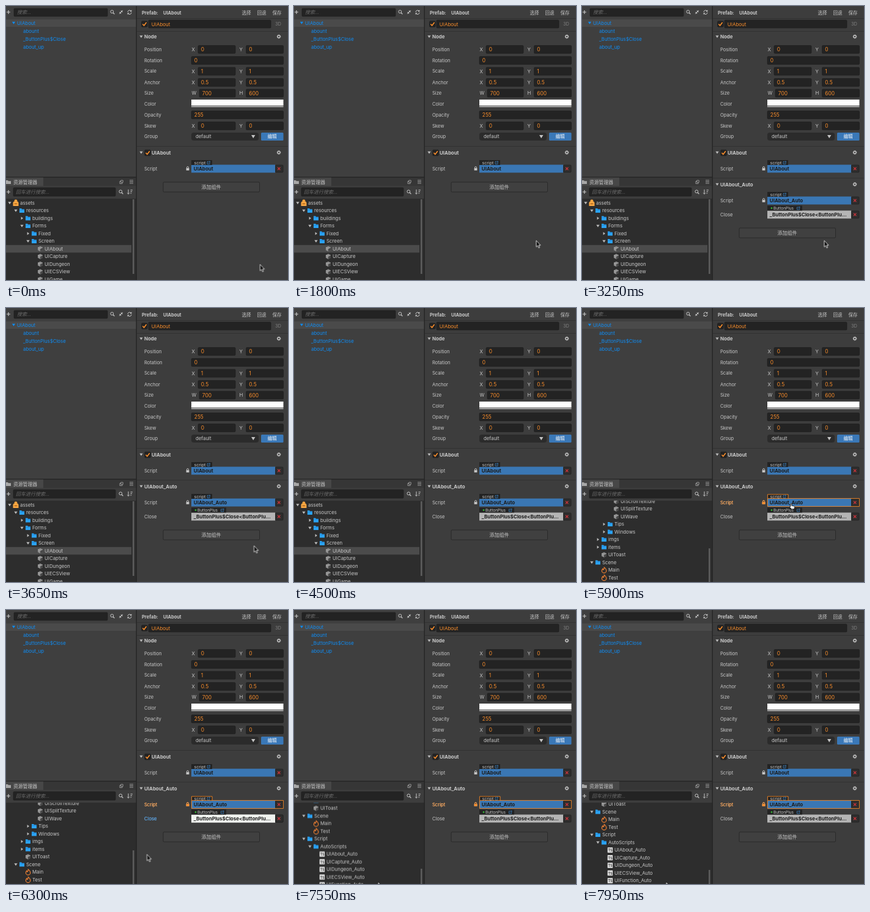
An HTML page for the animation above (8000 ms loop, 461 px wide and 448 px high).

```html
<!DOCTYPE html>
<html lang="zh">
<head>
<meta charset="utf-8">
<style>
html, body { margin: 0; width: 100%; height: 100%; overflow: hidden; background: #3d3d3d; }
svg { display: block; width: 461px; height: 448px; }
text { font-family: Inter, "Noto Sans CJK SC", "Noto Sans CJK", sans-serif; white-space: pre; }
.step, .move { animation: 8s linear infinite; }
.step { animation-timing-function: step-end; }
#plain { animation-name: plain; }
#auto { animation-name: auto; }
#scriptHover { animation-name: scriptHover; }
#scriptFocus { animation-name: scriptFocus; }
#closeHover { animation-name: closeHover; }
#hand { animation-name: hand; }
#arrow { animation-name: arrow; }
#list { animation-name: list; }
#thumb { animation-name: thumb; }
#cursor { animation-name: cursor; }
@keyframes plain { 0% { opacity: 1 } 33.1%, 100% { opacity: 0 } }
@keyframes auto { 0% { opacity: 0 } 33.1%, 100% { opacity: 1 } }
@keyframes scriptHover { 0% { opacity: 0 } 66.9% { opacity: 1 } 72.7%, 100% { opacity: 0 } }
@keyframes scriptFocus { 0% { opacity: 0 } 72.7%, 100% { opacity: 1 } }
@keyframes closeHover { 0% { opacity: 0 } 65.7% { opacity: 1 } 66.9% { opacity: 0 } 75.9% { opacity: 1 } 79.2%, 100% { opacity: 0 } }
@keyframes hand { 0% { opacity: 0 } 67.2% { opacity: 1 } 74.9%, 100% { opacity: 0 } }
@keyframes arrow { 0% { opacity: 1 } 67.2% { opacity: 0 } 74.9%, 100% { opacity: 1 } }
@keyframes list {
  0%, 72.69% { transform: translateY(0) }
  72.7%, 87% { transform: translateY(-206px) }
  95%, 100% { transform: translateY(-292px) }
}
@keyframes thumb {
  0%, 72.69% { transform: translateY(0) }
  72.7%, 87% { transform: translateY(77px) }
  95%, 100% { transform: translateY(109px) }
}
@keyframes cursor {
  0%, .5% { transform: translate(415.3px, 422.5px) }
  3.1%, 45% { transform: translate(396px, 383.5px) }
  50%, 63.9% { transform: translate(470px, 424px) }
  64% { transform: translate(447px, 388px); animation-timing-function: ease-out }
  68%, 74.4% { transform: translate(342px, 319px) }
  78.75% { transform: translate(231.5px, 399px); animation-timing-function: ease-out }
  80.6%, 100% { transform: translate(138px, 446px) }
}
</style>
</head>
<body>
<svg id="stage" viewBox="0 0 461 448"></svg>
<script>
const INK = '#c8c8c8', DARK = '#232323', PANEL = '#3d3d3d', ORANGE = '#f98d2b', BLUE = '#0f8df5', FIELD = '#3a77b4';

const rect = (x, y, w, h, fill, extra = '') =>
  `<rect x="${x}" y="${y}" width="${w}" height="${h}" fill="${fill}" ${extra}/>`;
const path = (d, fill, stroke = 'none', width = 1) =>
  `<path d="${d}" fill="${fill}" stroke="${stroke}" stroke-width="${width}"/>`;
const line = (d, color = INK, width = 1) => path(d, 'none', color, width);
// y is the vertical middle of the capitals
const text = (x, y, s, fill = INK, size = 7.8, extra = '') =>
  `<text x="${x}" y="${y + size * .36}" font-size="${size}" fill="${fill}" ${extra}>${s.replace(/</g, '&lt;')}</text>`;
const bold = (x, y, s, fill = INK, size = 7.9) => text(x, y, s, fill, size, 'font-weight="700"');
const middle = (x, y, s, fill, size) => text(x, y, s, fill, size, 'text-anchor="middle"');
const box = (x, y, w, h, fill = DARK) => rect(x, y, w, h, fill, 'rx="1.5" stroke="#1c1c1c" stroke-width=".6"');
const group = (id, kind, body) => `<g id="${id}" class="${kind}">${body}</g>`;

const down = (x, y, c = '#bbb') => path(`M${x - 2.6} ${y - 1.7}h5.2l-2.6 4z`, c);
const right = (x, y, c = '#bbb') => path(`M${x - 1.4} ${y - 2.5}v5l3.4-2.5z`, c);
const plus = (x, y) => line(`M${x - 3} ${y}h6M${x} ${y - 3}v6`, INK, 1.2);
const lens = (x, y) => `<circle cx="${x - .7}" cy="${y - .7}" r="2.4" fill="none" stroke="${INK}"/>` +
  line(`M${x + 1} ${y + 1}l2.4 2.4`, INK, 1.3);
const gear = (x, y) => `<circle cx="${x}" cy="${y}" r="2" fill="none" stroke="#c4c4c4" stroke-width="1.3"/>` +
  `<circle cx="${x}" cy="${y}" r="2.9" fill="none" stroke="#c4c4c4" stroke-width="1" stroke-dasharray="1.14"/>`;
const check = (x, y) => box(x - 4.8, y - 4.8, 9.6, 9.6) + line(`M${x - 3} ${y}l2.3 2.6 4-5.4`, ORANGE, 1.6);
const lock = (x, y, c = '#bbb') => rect(x - 2.4, y - .6, 4.8, 3.7, c) +
  line(`M${x - 1.5} ${y}v-1.6a1.5 1.5 0 0 1 3 0v1.6`, c, .9);
const link = (x, y) => line(`M${x} ${y - 1.6}h-2v4h4v-2M${x} ${y + .6}l2.4-2.6m-1.8 0h1.8v1.8`, '#3a7fbd', .8);

function hierarchy() {
  let s = rect(0, 0, 213, 281, '#3f3f3f') + plus(4, 10) + box(13, 4, 153, 13) +
    text(18, 10.5, '搜索...', '#6c6c6c', 8, 'font-style="italic"') + lens(174, 10) +
    line('M185 13l2.6-2.6m-2.3 0h2.3v2.3M191 7l-2.6 2.6m0-2.3v2.3h2.3') +
    line('M199 10a3 3 0 0 1 5.4-1.8M205 10.6a3 3 0 0 1-5.4 1.8') +
    path('M205.4 6.2v3h-3zM198.6 14.2v-3h3z', INK) +
    rect(0, 22, 213, 12, '#4a4a4a') + down(12.5, 27.5, BLUE);
  ['UIAbout', 'abount', '_ButtonPlus$Close', 'about_up'].forEach((name, i) => {
    s += text(i ? 28 : 18, 28 + 13.1 * i, name, BLUE, 7.85);
  });
  return s;
}

const tree = `0 v db assets
1 v dir resources
2 > dir buildings
2 v dir Forms
3 > dir Fixed
3 v dir Screen
4 - cube UIAbout
4 - cube UICapture
4 - cube UIDungeon
4 - cube UIECSView
4 - cube UIGame
4 - cube UIHome
4 - cube UILoading
4 - cube UILogin
4 - cube UIMap
4 - cube UINav
4 - cube UIScrollTexture
4 - cube UISplitTexture
4 - cube UIWave
3 > dir Tips
3 > dir Windows
2 > dir imgs
2 > dir items
2 - cube UIToast
1 v dir Scene
2 - fire Main
2 - fire Test
1 v dir Script
2 v dir AutoScripts
3 - ts UIAbout_Auto
3 - ts UICapture_Auto
3 - ts UIDungeon_Auto
3 - ts UIECSView_Auto
3 - ts UIFunction_Auto`.split('\n').map(row => row.split(' '));

const icons = {
  db: (x, y) => path(`M${x - 4.5} ${y + 5}v-5q0-2.2 2.2-2.4v-2l1.2-1h2.2l1.2 1v2q2.2.2 2.2 2.4v5z`, '#f7a541') +
    line(`M${x - 2.2} ${y + 1.4}h4.4`, '#8a4d10', 1),
  dir: (x, y) => path(`M${x - 4} ${y + 3.5}v-7h3.2l1 1.3h3.8v5.7z`, '#2ba3f7') +
    line(`M${x - 4} ${y - 1.2}h8`, '#1c74bb', .6),
  cube: (x, y) => path(`M${x} ${y - 4.2}l4 2v4.4l-4 2-4-2v-4.4z`, '#8f8f8f') +
    path(`M${x} ${y - .2}l4-2v4.4l-4 2z`, '#484848') + line(`M${x - 4} ${y - 2.2}l4 2 4-2`, '#b8b8b8', .6),
  fire: (x, y) => path(`M${x + .4} ${y - 4.4}q3.6 3 3.4 5.6a3.7 3.5 0 0 1-7.4 0q0-2 1.7-3.4 0 1.6 1 1.8 1.6-1.6 1.3-4z`, 'none', '#f08033', 1.2),
  ts: (x, y) => rect(x - 4.2, y - 4.2, 8.4, 8.4, '#eee') + bold(x - 3.6, y + .8, 'TS', '#333', 5.6)
};

function assets() {
  const rows = tree.map(([depth, fold, icon, name], i) => {
    const x = 10 * depth, y = 322 + 12.5 * i;
    return (i === 6 ? rect(0, y - 6.2, 205, 12.4, '#4b4b4b') : '') +
      (fold === 'v' ? down(x + 6, y) : fold === '>' ? right(x + 6, y) : '') +
      icons[icon](x + 16, y) + text(x + 23, y, name, INK, 7.85);
  }).join('');
  return rect(0, 279, 213, 169, '#2a2a2a') + rect(0, 281, 213, 13, '#363636') +
    rect(0, 280.5, 61, 13.5, '#474747') + path('M0 291v-6h3l1 1.2h4v4.8z', '#a8a8a8') +
    text(12, 287.7, '资源管理器', INK, 7.8) +
    line('M188 286.5h-2v4h4v-2M187.8 285h3.4v3.4h-3.4z', '#aaa', .8) +
    line('M202 285h6M202 287.5h6M202 290h6', '#aaa', .9) +
    rect(0, 294, 213, 21, PANEL) + plus(4, 304) + box(12, 297, 167, 14) +
    text(16, 304, '回车进行搜索...', '#6c6c6c', 8, 'font-style="italic"') + lens(188, 304) +
    line('M200 300v7.4m-1.8-1.8l1.8 1.9 1.8-1.9M203.5 301h3.4M203.5 303.6h2.6M203.5 306.2h1.6') +
    rect(0, 315, 213, 133, '#2d2d2d') +
    '<clipPath id="view"><rect y="315" width="213" height="133"/></clipPath>' +
    `<g clip-path="url(#view)">${group('list', 'move', rows)}` +
    group('thumb', 'move', rect(207, 316, 2.6, 122, '#5c5c5c')) + '</g>';
}

const value = (x, y, w, s, size = 8.4) => box(x, y - 6.5, w, 13) + text(x + 4.8, y + .2, s, ORANGE, size);
const cut = y => rect(214, y, 247, 1, '#323232');

function tag(y, name, dot) {
  return dot
    ? rect(303, y - 4, 57, 8, DARK) + `<circle cx="310" cy="${y}" r="1.4" fill="#35a935"/>` +
      text(313, y, name, INK, 6.5) + link(353.5, y)
    : rect(303, y - 4, 34, 8, DARK) + text(307.5, y, name, INK, 7.1) + link(331, y);
}
const slot = (y, s, fill) => rect(303, y - 6.5, 137, 13, fill) + bold(306.8, y, s, '#1c1c1c', 8);
const cross = y => box(440.5, y - 6, 12.5, 12, '#2d2d2d') +
  line(`M444 ${y - 2.2}l4.4 4.4m0-4.4l-4.4 4.4`, '#c5353b', 1.3);
const label = (y, s, c) => text(226, y, s, c, 7.6);
const scriptRow = (y, s, fill = FIELD, tint = INK) =>
  label(y, 'Script', tint) + lock(297, y - .3, tint) + slot(y, s, fill) + tag(y - 10, 'script') + cross(y);
const closeRow = (fill, tint) => label(341, 'Close', tint) +
  slot(341, '_ButtonPlus$Close<ButtonPlu...', fill) + tag(330.5, 'ButtonPlus', true) + cross(341);
const addButton = y => box(257, y - 8, 157.5, 16, '#404040') + middle(335.5, y, '添加组件', INK, 8);

function inspector() {
  let s = rect(213, 0, 248, 448, PANEL) + rect(212.5, 0, 1.5, 448, '#262626') +
    bold(222, 11, 'Prefab:', INK, 7.5) + bold(257, 11, 'UIAbout', INK, 7.4);
  ['选择', '回退', '保存'].forEach((word, i) => { s += text(385.5 + 25 * i, 11, word, INK, 7.5); });
  s += rect(214, 20, 247, 1, '#323232') + check(226.3, 29.5) + value(233, 29.5, 200, 'UIAbout', 8) +
    text(440, 29, '3D', '#808080', 7.4) + cut(41) + down(221, 50) + bold(226, 50.5, 'Node') + gear(446, 50);
  const pairs = [['Position', 71, 'X', '0', 'Y', '0'], ['Scale', 106.7, 'X', '1', 'Y', '1'],
    ['Anchor', 125, 'X', '0.5', 'Y', '0.5'], ['Size', 142.5, 'W', '700', 'H', '600'],
    ['Skew', 196, 'X', '0', 'Y', '0']];
  for (const [name, y, a, left, b, rightValue] of pairs) {
    const inset = a === 'W' ? 2 : 0;
    s += label(y, name) + text(303.5, y, a) + value(314 + inset, y, 61 - inset, left) +
      text(381.5, y, b) + value(392.5, y, 61, rightValue);
  }
  s += label(89, 'Rotation') + value(303, 89, 150.5, '0') + label(178, 'Opacity') + value(303, 178, 150.5, '255') +
    label(160, 'Color') + rect(303, 153, 150.5, 13, DARK) + rect(303, 153, 150.5, 10, '#fff') +
    rect(303, 164, 150.5, 1.2, '#fff') +
    label(213.5, 'Group') + rect(303, 207, 110, 13, '#2b2b2b', 'rx="4"') + text(310, 213.5, 'default', INK, 7.8) +
    path('M401 211h6.4l-3.2 5.2z', '#c4c4c4') +
    rect(417, 207, 36.5, 13, '#3a78b8', 'rx="1.5"') + middle(435, 213.5, '编辑', '#fff', 7.5);
  return s + cut(229) + down(221, 239.5) + check(231.5, 240) + bold(238, 240, 'UIAbout') + gear(446, 239.5) +
    scriptRow(266, 'UIAbout');
}

const focusRing = `<g fill="none" stroke="${ORANGE}" stroke-width=".9">` +
  '<path d="M303.4 311.4h150v13h-150zM303.4 311.4v-6.6h33.6v6.6"/></g>';

const autoPart = cut(281) + down(221, 291.5) + bold(226, 292, 'UIAbout_Auto') + gear(446, 291.5) +
  scriptRow(318, 'UIAbout_Auto') +
  group('scriptHover', 'step', scriptRow(318, 'UIAbout_Auto', '#64a6e6', '#2a8ade')) +
  group('scriptFocus', 'step', scriptRow(318, 'UIAbout_Auto', FIELD, ORANGE) + focusRing) +
  closeRow('#b5b5b5', INK) + group('closeHover', 'step', closeRow('#f0f3ef', '#2a8ade')) + addButton(371);

const pointer = group('cursor', 'move',
  group('arrow', 'step', path('M0 0v10.4l2.3-2.1 1.7 3.7 1.7-.7-1.7-3.6h3.2z', '#111', '#fff', .8)) +
  group('hand', 'step', path('M-1 5.6v-4.4q.9-1.3 1.8 0v3l4 .9q1 .3.8 1.6l-.8 3.1h-4.4l-3-3.6q-.3-1.2 1.6-.6z', '#fff', '#111', .8)));

document.getElementById('stage').innerHTML = hierarchy() + assets() + inspector() +
  group('plain', 'step', addButton(296)) + group('auto', 'step', autoPart) + pointer;
</script>
</body>
</html>
```
